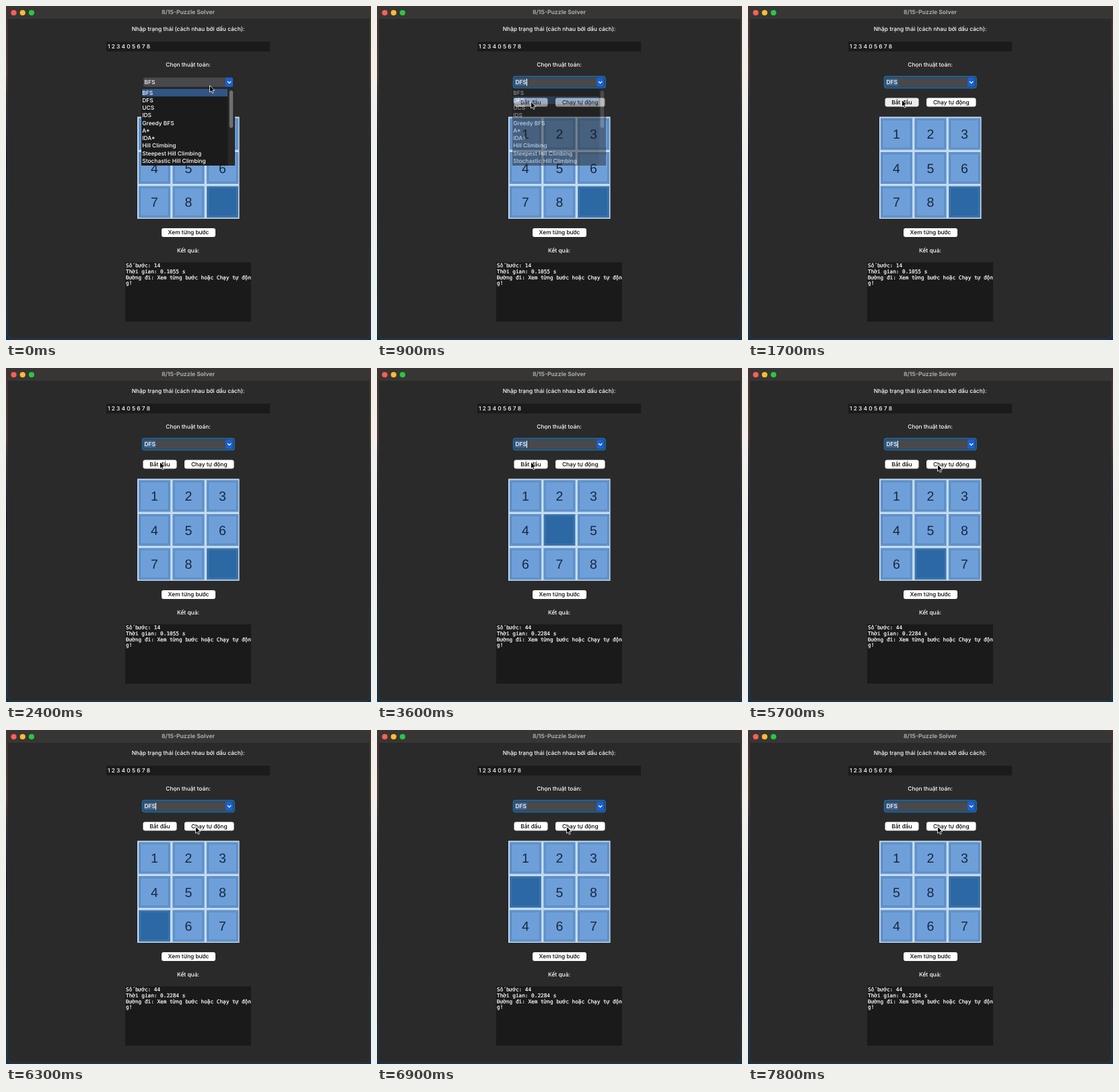
Animation, 542 px wide and 496 px high, one loop 8000 ms. Source, as an HTML page:

```html
<!DOCTYPE html>
<html lang="vi">
<head>
<meta charset="utf-8">
<title>8/15-Puzzle Solver</title>
<style>
html, body { margin: 0; width: 100%; height: 100%; overflow: hidden; background: #14243a; }
svg { display: block; }
text { font: 500 8.4px Inter, sans-serif; fill: #fff; text-rendering: geometricPrecision; white-space: pre; }
.mid { text-anchor: middle; }
.title { font-size: 8.6px; font-weight: 700; fill: #aaa; }
.dark { fill: #000; }
.mono { font: 7.72px "DejaVu Sans Mono", monospace; stroke: #fff; stroke-width: .22px; }
.digit { font: 19.5px "Liberation Sans", Arial, sans-serif; fill: #17293e; text-anchor: middle; }
</style>
</head>
<body>
<svg id="stage" width="542" height="496" viewBox="0 0 542 496">
  <defs>
    <linearGradient id="desk" x2="0" y2="1">
      <stop offset="0" stop-color="#4c2f2c"/><stop offset=".2" stop-color="#5e3a32"/>
      <stop offset=".26" stop-color="#38303a"/><stop offset=".45" stop-color="#171d2e"/>
      <stop offset="1" stop-color="#12324c"/>
    </linearGradient>
  </defs>
</svg>
<script>
const stage = document.getElementById('stage');

function add(parent, tag, attrs, content = '') {
  const el = document.createElementNS('http://www.w3.org/2000/svg', tag);
  for (const key in attrs) el.setAttribute(key, attrs[key]);
  el.textContent = content;
  return parent.appendChild(el);
}
const rect = (parent, x, y, width, height, fill, more) =>
  add(parent, 'rect', { x, y, width, height, fill, ...more });
const text = (parent, x, y, content, cls = '') =>
  add(parent, 'text', { x, y, class: cls }, content);
const show = (el, on) => el.setAttribute('visibility', on ? 'visible' : 'hidden');

function button(x, y, width, label) {
  const face = rect(stage, x, y, width, 13, '#fff', { rx: 3 });
  text(stage, x + width / 2, y + 9.4, label, 'mid dark');
  return face;
}

// Window
rect(stage, 0, 0, 542, 496, 'url(#desk)');
rect(stage, 2.3, .3, 538, 494, '#2a2a2a', { rx: 7, stroke: '#444', 'stroke-width': .6 });
add(stage, 'path', { d: 'M2.3 19V7a6.5 6.5 0 0 1 6.5-6.5H533.8a6.5 6.5 0 0 1 6.5 6.5V19z', fill: '#373635' });
['#ff5f57', '#febc2e', '#28c840'].forEach((fill, i) =>
  add(stage, 'circle', { cx: 11.5 + 13.2 * i, cy: 10, r: 4.1, fill }));
text(stage, 270.5, 12, '8/15-Puzzle Solver', 'mid title');
text(stage, 270.5, 37, 'Nhập trạng thái (cách nhau bởi dấu cách):', 'mid');
rect(stage, 149, 53, 243, 14.5, '#1b1b1b');
text(stage, 151, 62.8, '1 2 3 4 0 5 6 7 8');
text(stage, 270.5, 90.3, 'Chọn thuật toán:', 'mid');

// Combo box
const ring = rect(stage, 202.7, 104.7, 136, 16.8, 'none', { rx: 3, stroke: '#1a6aa6', 'stroke-width': 2 });
rect(stage, 204, 106.3, 133, 13.7, '#49484b', { rx: 2.5 });
rect(stage, 326, 106.3, 11, 13.7, '#1a5fd2', { rx: 2.5 });
add(stage, 'path', { d: 'M329 112l2.6 2.6 2.6-2.6', fill: 'none', stroke: '#fff', 'stroke-width': 1.3 });
const selection = rect(stage, 205, 108, 17.5, 10.5, '#3f638b');
const choice = text(stage, 205.5, 116.3, 'BFS');
const caret = rect(stage, 222, 108, 1, 10.5, '#fff');

const startButton = button(203.5, 136.5, 50, 'Bắt đầu');
const autoButton = button(265, 136.5, 73.5, 'Chạy tự động');
button(231, 330, 80, 'Xem từng bước');

// Board
rect(stage, 195, 164.5, 151.5, 151.5, '#c3dcf3');
const cells = Array.from({ length: 9 }, (_, i) => {
  const x = 197.5 + i % 3 * 50.5, y = 167 + Math.floor(i / 3) * 50.5;
  const face = rect(stage, x, y, 46, 46, '', { stroke: '#5585b8' });
  rect(stage, x + 2, y + 2, 42, 42, 'none', { stroke: '#4a7cb3', 'stroke-width': .8 });
  return { face, label: text(stage, x + 23, y + 30, '', 'digit') };
});

// Result
text(stage, 270.5, 365.8, 'Kết quả:', 'mid');
rect(stage, 177, 380.7, 187, 88, '#1a1a1a');
const lines = [0, 1, 2, 3].map(i => text(stage, 178, 388.2 + 8.7 * i, '', 'mono'));
lines[2].textContent = 'Đường đi: Xem từng bước hoặc Chạy tự độn';
lines[3].textContent = 'g!';

// Drop-down list
const popup = add(stage, 'g', {});
rect(popup, 201, 122.3, 139, 114.7, '#1b1b1b');
rect(popup, 329.5, 122.3, 10.5, 114.7, '#292929');
rect(popup, 331.7, 125.5, 5.4, 55.5, '#707070', { rx: 2.7 });
const highlight = rect(popup, 202, 123, 127, 11.3, '#315584');
['BFS', 'DFS', 'UCS', 'IDS', 'Greedy BFS', 'A*', 'IDA*', 'Hill Climbing',
  'Steepest Hill Climbing', 'Stochastic Hill Climbing']
  .forEach((name, i) => text(popup, 202.3, 131.5 + 11.28 * i, name));

const pointer = add(stage, 'path', {
  d: 'M0 0V10L2.3 8 3.9 11.5 5.6 10.8 4.1 7.3H7.3z',
  fill: '#000', stroke: '#fff', 'stroke-width': .8, 'stroke-linejoin': 'round'
});

// Pointer stops: time, x, y
const path = [[0, 302.5, 118], [600, 228.5, 142], [1200, 228.5, 142], [1500, 228.5, 139.5],
  [3900, 228.5, 139.5], [4300, 281.5, 143.5], [8000, 281.5, 143.5]];
// Blank moves: time, index offset
const moves = [[4700, 1], [5200, 3], [5700, -1], [6200, -1], [6700, -3], [7200, 1], [7800, 1]];

function pointerAt(t) {
  const i = path.findIndex(p => p[0] > t);
  const [t0, x0, y0] = path[i - 1], [t1, x1, y1] = path[i];
  const u = (t - t0) / (t1 - t0), k = u * u * (3 - 2 * u);
  return [x0 + (x1 - x0) * k, y0 + (y1 - y0) * k];
}

function boardAt(t) {
  if (t < 3000) return [1, 2, 3, 4, 5, 6, 7, 8, 0];
  const board = [1, 2, 3, 4, 0, 5, 6, 7, 8];
  let blank = 4;
  for (const [time, offset] of moves) {
    if (t < time) break;
    board[blank] = board[blank + offset];
    board[blank += offset] = 0;
  }
  return board;
}

function draw(now) {
  const t = Math.floor(now % 8000 / 100) * 100;
  const chosen = t >= 800, solved = t >= 3000;

  choice.textContent = chosen ? 'DFS' : 'BFS';
  show(ring, chosen);
  show(selection, chosen);
  show(caret, chosen && t % 900 < 600);
  popup.setAttribute('opacity', Math.max(0, Math.min(1, chosen ? (1100 - t) / 420 : 1)));
  highlight.setAttribute('y', chosen ? 134.3 : 123);
  startButton.setAttribute('fill', t === 1700 ? '#ececec' : '#fff');
  autoButton.setAttribute('fill', t === 4500 ? '#ececec' : '#fff');

  boardAt(t).forEach((value, i) => {
    cells[i].face.setAttribute('fill', value ? '#6f9fd9' : '#2c68a3');
    cells[i].label.textContent = value || '';
  });
  lines[0].textContent = 'Số bước: ' + (solved ? 44 : 14);
  lines[1].textContent = `Thời gian: ${solved ? '0.2284' : '0.1055'} s`;
  pointer.setAttribute('transform', `translate(${pointerAt(t)})`);
  requestAnimationFrame(frame);
}

const start = performance.now();
function frame() { draw(performance.now() - start); }
frame();
</script>
</body>
</html>
```
